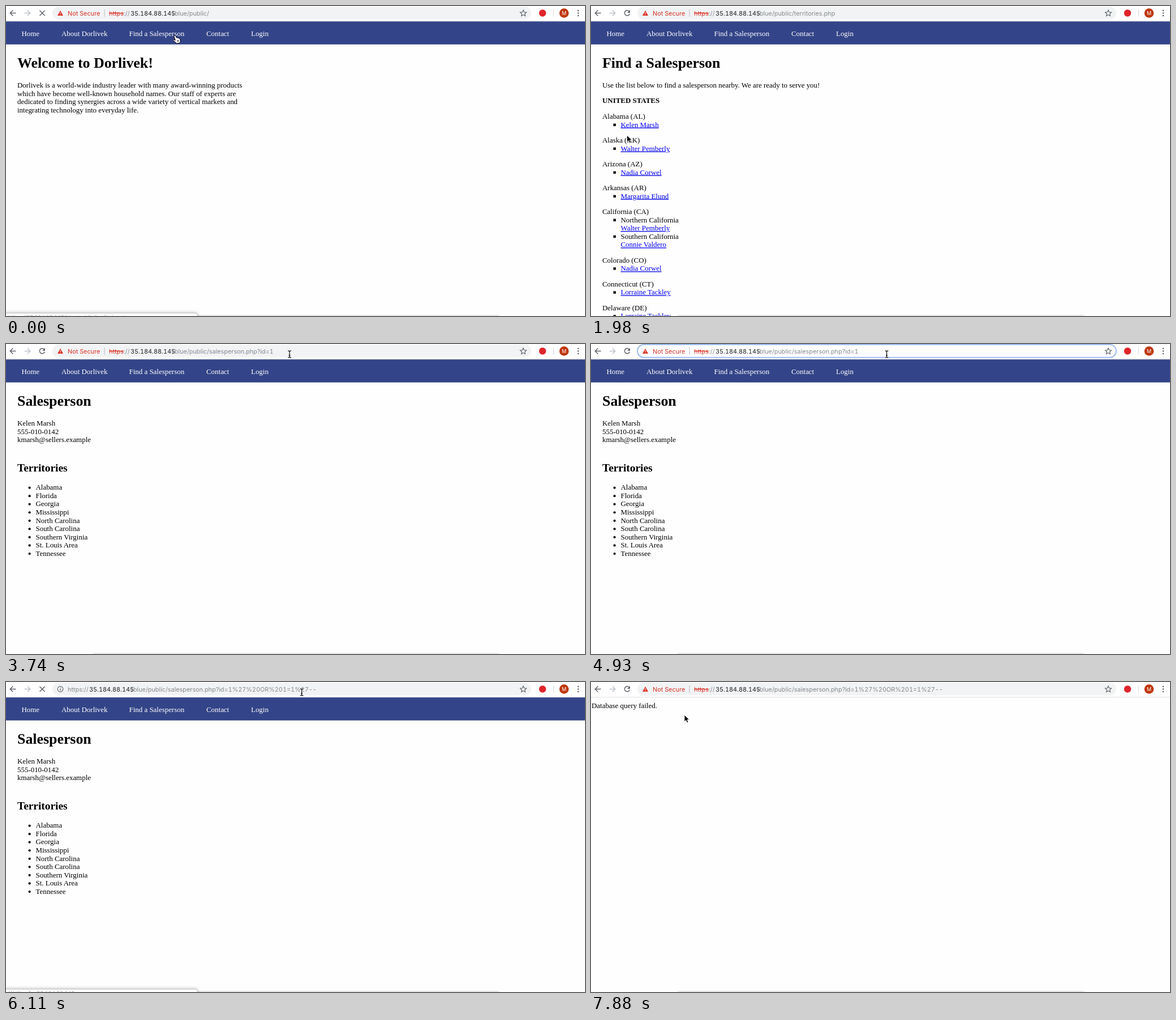
An HTML page for the animation above (8000 ms loop, 1023 by 547 pixels).

```html
<!DOCTYPE html>
<html lang="en">
<head>
<meta charset="utf-8">
<title>Browser session</title>
<style>
  html, body { margin: 0; width: 100%; height: 100%; overflow: hidden; background: #fefefe; }
  svg { display: block; width: 100vw; height: 100vh; }
  text { white-space: pre; }
  .page { font: 12.93px "Liberation Serif", serif; fill: #000; }
  .h1 { font-size: 25.87px; font-weight: 700; }
  .h2 { font-size: 19.4px; font-weight: 700; }
  .b { font-weight: 700; }
  .link { fill: #00e; text-decoration: underline; }
  .nav { fill: #fff; }
  .ui { font: 10.85px Inter, sans-serif; font-variant-numeric: tabular-nums; fill: #85898d; }
  .dark { fill: #202124; }
  .red { fill: #d93025; }
  .strike { fill: #d93025; text-decoration: line-through; }
  .hit { fill: #1a73e8; font-size: 11px; font-weight: 600; letter-spacing: .25px; }
  .small { font-size: 9.2px; }
  .line { fill: none; stroke: #5f6368; stroke-width: 1.5; }
  #drop { filter: drop-shadow(0 7px 4px rgba(0, 0, 0, .22)); }
  #status { filter: drop-shadow(0 0 3px rgba(0, 0, 0, .3)); }
</style>
</head>
<body>
<svg viewBox="0 0 1023 547">
  <g id="page" class="page"></g>
  <path d="M152 547Q153 545 157 545H868Q872 545 873 547Z" fill="#e6e6e6"/>
  <g id="status"></g>
  <rect width="1023" height="27.3" fill="#d6d6d8"/>
  <rect width="1023" height="26.5" fill="#fff"/>
  <g id="bar" class="ui"></g>
  <g id="drop" class="ui"></g>
  <g id="cursor"></g>
</svg>
<script>
const LOOP = 8000, LINE = 14.55;
const HOST = '35.184.88.145', DIR = '/blue/public/';
const $ = id => document.getElementById(id);

const text = (x, y, s, cls = '') => `<text x="${x}" y="${y}" class="${cls}">${s}</text>`;
const span = (cls, s) => `<tspan class="${cls}">${s}</tspan>`;
const rect = (x, y, w, h, fill, rx = 0) =>
  `<rect x="${x}" y="${y}" width="${w}" height="${h}" rx="${rx}" fill="${fill}"/>`;
const dot = (x, y, r, fill) => `<circle cx="${x}" cy="${y}" r="${r}" fill="${fill}"/>`;
const path = (d, attrs = 'class="line"') => `<path d="${d}" ${attrs}/>`;
const lines = (x, y, list) => list.map((s, i) => text(x, y + i * LINE, s)).join('');

// Pages

const nav = rect(0, 27, 1023, 40.8, '#334488') + [
  [27.5, 'Home'], [98, 'About Dorlivek'], [217.5, 'Find a Salesperson'],
  [354, 'Contact'], [433, 'Login']
].map(([x, s]) => text(x, 52.7, s, 'nav')).join('');

const title = s => nav + text(20, 108.6, s, 'h1');

const people = {
  w: 'Walter Pemberly', n: 'Nadia Corwel', l: 'Lorraine Tackley',
  k: 'Kelen Marsh', m: 'Margarita Elund', c: 'Connie Valdero'
};
// State, then its sellers; a seller may have a region label
const states = [
  ['Alabama (AL)', 'k'], ['Alaska (AK)', 'w'], ['Arizona (AZ)', 'n'], ['Arkansas (AR)', 'm'],
  ['California (CA)', 'w:Northern California', 'c:Southern California'],
  ['Colorado (CO)', 'n'], ['Connecticut (CT)', 'l'], ['Delaware (DE)', 'l']
];

function stateList() {
  let y = 199, out = '';
  for (const [name, ...sellers] of states) {
    out += text(20, y, name);
    for (const seller of sellers) {
      const [key, region] = seller.split(':');
      y += LINE;
      out += rect(39.5, y - 6, 4.4, 4.4, '#000');
      if (region) {
        out += text(52.5, y, region);
        y += LINE;
      }
      out += text(52.5, y, people[key], 'link');
    }
    y += 27.45;
  }
  return out;
}

const areas = ['Alabama', 'Florida', 'Georgia', 'Mississippi', 'North Carolina',
  'South Carolina', 'Southern Virginia', 'St. Louis Area', 'Tennessee'];

const pages = {
  home: title('Welcome to Dorlivek!') + lines(20, 144, [
    'Dorlivek is a world-wide industry leader with many award-winning products',
    'which have become well-known household names. Our staff of experts are',
    'dedicated to finding synergies across a wide variety of vertical markets and',
    'integrating technology into everyday life.']),
  list: title('Find a Salesperson') +
    text(20, 144, 'Use the list below to find a salesperson nearby. We are ready to serve you!') +
    text(20, 171.4, 'UNITED STATES', 'b') + stateList(),
  person: title('Salesperson') +
    lines(20, 144, [people.k, '555-010-0142', 'kmarsh@sellers.example']) +
    text(20, 224.6, 'Territories', 'h2') + lines(52.5, 257.3, areas) +
    areas.map((_, i) => dot(41.6, 253.6 + i * LINE, 2.1, '#000')).join(''),
  failed: text(1, 45.7, 'Database query failed.')
};

// Browser chrome

const globe = y => dot(96, y, 5.2, '#5f6368') +
  path(`M92 ${y - 1}l3 2 0 3-2 -1zM96 ${y - 4}l3 1-2 2-2 -1zM98 ${y}l2.4 1-2 2.6-1.4-2z`, 'fill="#fff"');

const frame = path('M17.5 12.5H7.5M12.3 7.5l-5 5 5 5') +
  path('M32.5 12.5H42.5M37.7 7.5l5 5-5 5', 'class="line" style="stroke:#bdc1c6"');
const reload = path('M67.4 9.2A4.6 4.6 0 1 0 68.4 13.6') +
  path('M69 7v5h-5z', 'fill="#5f6368"');
const stop = path('M59.5 8l9 9M68.5 8l-9 9');
const star = path('M914 7.2l1.6 3.6 3.9.4-2.9 2.6.8 3.8-3.4-2-3.4 2 .8-3.8-2.9-2.6 3.9-.4z',
  'class="line" style="stroke-width:1.2"');
const tools = dot(948, 12.5, 6.2, '#e0242b') + rect(967, 6, 1, 13, '#d5d7da') +
  dot(986, 12.5, 8.3, '#bf360c') +
  '<text x="986" y="15.8" text-anchor="middle" style="font-size:9px;fill:#fff">M</text>' +
  [8, 12.5, 17].map(y => dot(1011, y, 1.3, '#5f6368')).join('');
const warning = path('M96 8l5 9H91z', 'fill="#d93025"') + rect(95.5, 11, 1, 3, '#fff') +
  rect(95.5, 14.8, 1, 1, '#fff') + text(109, 16.5, 'Not Secure', 'red') +
  rect(173.5, 6, 1, 13, '#b9bcc0');
const info = '<circle cx="96" cy="12.5" r="4.9" class="line" style="stroke-width:1.1"/>' +
  rect(95.4, 11.8, 1.2, 3.4, '#5f6368') + rect(95.4, 9.6, 1.2, 1.2, '#5f6368');

function address(x, file, secure) {
  const scheme = secure ? 'https://' : span('strike', 'https') + '://';
  return text(x, 16.5, scheme) + text(x + 38, 16.5, HOST, 'dark') +
    text(x + 112, 16.5, DIR + file);
}

function bar(s) {
  const field = s.focus
    ? '<rect x="82" y="1" width="846" height="22.8" rx="11.4" fill="#fff" stroke="#9fbff3" stroke-width="2"/>'
    : rect(82, 1.5, 846, 22, '#f1f3f4', 11);
  return frame + (s.loading ? stop : reload) + field + star + tools +
    (s.selected ? rect(182, 5, 291, 14, '#b5d5fd') : '') +
    (s.plain ? info + address(109, s.file, true) : warning + address(182, s.file)) +
    (s.caret && !s.drop ? rect(473, 5, 1, 14, '#202124') : '');
}

function drop(s) {
  if (!s.drop) return '';
  const query = "salesperson.php?id=1' OR 1=1'--";
  return path('M77 -10H933V79Q933 85 927 85H83Q77 85 77 79Z', 'fill="#fff"') +
    rect(77, 27, 856, 29, '#f1f2f3') + globe(12.5) + globe(41.3) +
    '<circle cx="95" cy="69.3" r="3.1" class="line" style="stroke-width:1.2"/>' +
    path('M97.3 71.6l3.4 3.4') +
    address(118, query, true) +
    text(118, 45.4, `https://${HOST}${DIR}salesperson.php?id=1%27 OR 1=1%27--`, 'hit') +
    text(118, 74.4, span('dark', `https://${HOST}${DIR}${query}`) + ' - Quorva Search') +
    (s.caret ? rect(464, 5, 1, 14, '#202124') : '');
}

const status = s => !s.status ? '' :
  `<g opacity="${s.fade}">` +
  path('M-2 550V542H335Q338 542 338 545V550Z', 'fill="#fff" stroke="#bdbdbd" stroke-width=".8"') +
  text(5, 552.6, s.status, 'ui small') + '</g>';

// Pointers, drawn around their hot spot

const beam = 'M-3 -6Q0 -6 0 -4.5V4.5Q0 6 -3 6M3 -6Q0 -6 0 -4.5M3 6Q0 6 0 4.5M-1.6 2H1.6';
const pointers = {
  arrow: path('M0 0V12L2.8 9.5 4.8 14 7 13 5 8.7H8.8Z', 'fill="#000" stroke="#fff" stroke-width=".9"'),
  hand: path('M-1.6 .3C-.6 -.5 .6 0 .9 1L2 4C3 3.4 4 3.8 4.3 4.4 5.3 3.9 6.2 4.4 6.5 5.2 7.6 4.9 8.3 5.6 8.5 6.6' +
    'L9 9.6C9.2 11 8.6 12 8 13L2.6 14.2C1 12 -1.4 10.4 -3.2 9.1 -4.2 8.2 -3.2 7 -2 7.4L.2 8.4 -2.1 1.9C-2.3 1.2 -2.1 .6 -1.6 .3Z' +
    'M3.5 8.6l.8 2.6M5.3 8.2l.8 2.6', 'fill="#fff" stroke="#000" stroke-width="1"'),
  beam: path(beam, 'fill="none" stroke="#fff" stroke-width="2.6"') +
    path(beam, 'fill="none" stroke="#000" stroke-width="1.2"')
};

// Timeline: each step changes part of the state

const waiting = `Waiting for ${HOST}...`;
const at = (kind, x, y) => ({ kind, x, y });
const steps = [
  [0, { page: 'home', file: '', loading: true, fade: 1,
    status: `https://${HOST}${DIR}territories.php`, ...at('hand', 299, 52) }],
  [150, { status: waiting }],
  [420, { page: 'list', file: 'territories.php' }],
  [580, at('hand', 306, 51)],
  [740, at('hand', 316, 48)],
  [905, at('hand', 328, 43)],
  [1065, at('hand', 336, 38)],
  [1230, { loading: false, fade: .6 }],
  [1390, { fade: .15 }],
  [1530, { status: '' }],
  [1980, at('arrow', 63.5, 228)],
  [2420, at('arrow', 68, 221)],
  [2585, at('hand', 75, 213)],
  [2750, at('hand', 81, 211)],
  [3040, { loading: true, status: waiting, fade: 1 }],
  [3220, { page: 'person', file: 'salesperson.php?id=1' }],
  [3400, { loading: false, fade: .4, ...at('arrow', 200, 140) }],
  [3580, { status: '', ...at('arrow', 410, 50) }],
  [3740, at('beam', 501, 18)],
  [3950, { focus: true, selected: true }],
  [4180, { selected: false, caret: true, ...at('beam', 510, 18) }],
  [4330, at('beam', 518, 18)],
  [4480, at('beam', 522.5, 18)],
  [4930, { caret: false }],
  [5220, { drop: true, caret: true }],
  [5670, { caret: false }],
  [5970, { drop: false, focus: false, plain: true, loading: true,
    file: 'salesperson.php?id=1%27%20OR%201=1%27--' }],
  [6110, { status: waiting, fade: 1 }],
  [6890, { page: 'failed', plain: false, loading: false }],
  [7055, { fade: .4 }],
  [7220, { status: '', ...at('beam', 500, 20) }],
  [7385, at('arrow', 420, 31)],
  [7550, at('arrow', 300, 44)],
  [7715, at('arrow', 205, 54)],
  [7880, at('arrow', 165, 58)]
];

let state = {};
const timeline = steps.map(([t, change]) => ({ t, ...(state = { ...state, ...change }) }));
let shown, shownPage;

function draw(s) {
  if (s.page !== shownPage) $('page').innerHTML = pages[shownPage = s.page];
  $('status').innerHTML = status(s);
  $('bar').innerHTML = bar(s);
  $('drop').innerHTML = drop(s);
  $('cursor').innerHTML = pointers[s.kind];
  $('cursor').setAttribute('transform', `translate(${s.x} ${s.y})`);
}

const start = performance.now();
function tick() {
  const t = (performance.now() - start) % LOOP;
  const now = timeline.filter(s => s.t <= t).pop();
  if (now !== shown) draw(shown = now);
  requestAnimationFrame(tick);
}
tick();
</script>
</body>
</html>
```
